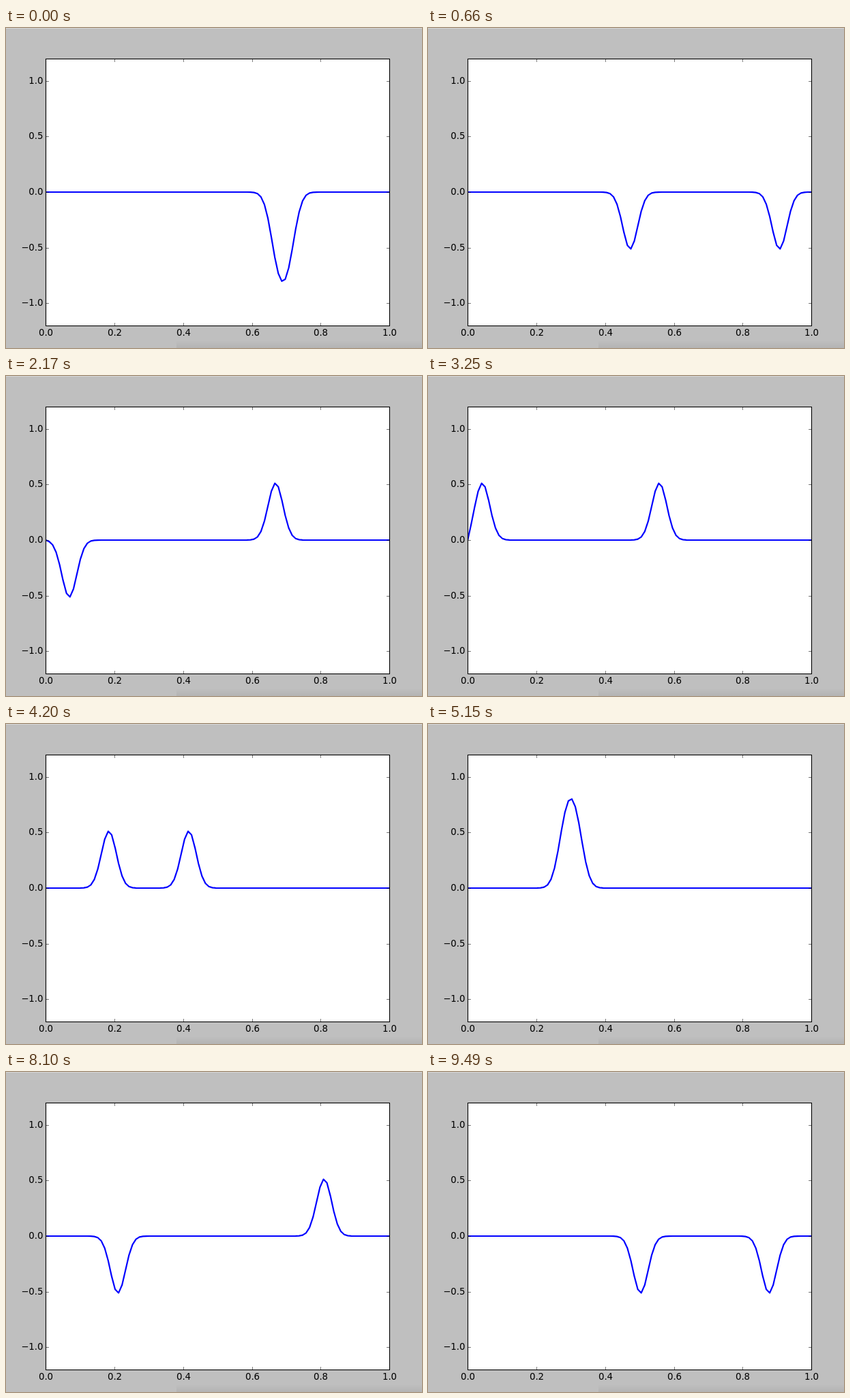
These frames come from a looping animation (610 by 470 pixels, 9590 ms). An HTML page with a canvas:

```html
<!DOCTYPE html>
<html lang="en">
<head>
<meta charset="utf-8">
<title>Wave on a string</title>
<style>
  html, body { margin: 0; width: 100%; height: 100%; overflow: hidden; background: #bfbfbf; }
  canvas { display: block; }
</style>
</head>
<body>
<canvas id="stage" width="610" height="470"></canvas>
<script>
const ctx = document.getElementById('stage').getContext('2d');
const LOOP = 9590;
const BOX = { x: 58.2, y: 45, w: 504, h: 392 };
const POINTS = 100, WALL = 98, START = 29.7, FIRST_STEP = 96.5;
const REST = 260, UPDATE = 60;

// Key points of the run: by this time the solver has done this many steps,
// in so many equal beats. Each beat is a rest, then a burst of updates.
const KEYS = [
  { time: 1680, step: 59 }, { time: 1840, step: 59 },
  { time: 2230, step: 65 }, { time: 2670, step: 65 },
  { time: 3370, step: 77 }, { time: 3890, step: 85 },
  { time: 4860, step: 99, beats: 2 }, { time: 6690, step: 130, beats: 4 },
  { time: 7060, step: 131 }, { time: 7840, step: 148 },
  { time: 8540, step: 162 }, { time: 9490, step: 179, beats: 3 }
];

// Share of a beat's steps done after the given time; updates slow down slightly.
function beatProgress(elapsed, length) {
  const rest = Math.min(REST, 0.6 * length);
  if (elapsed < rest) return 0;
  const gaps = Math.max(1, Math.round((length - rest) / UPDATE));
  const done = Math.floor((elapsed - rest) / (length - rest) * gaps + 0.25);
  const p = Math.min(1, (done + 1) / (gaps + 1));
  return p + 0.17 * p * (1 - p);
}

function stepAt(time) {
  let from = { time: 90 - REST, step: 0 };
  for (const to of KEYS) {
    if (time <= to.time) {
      const beats = to.beats || 1;
      const length = (to.time - from.time) / beats;
      const elapsed = time - from.time;
      const beat = Math.min(beats - 1, Math.floor(elapsed / length));
      const progress = beat + beatProgress(elapsed - beat * length, length);
      return Math.floor(from.step + (to.step - from.step) * progress / beats + 1e-6);
    }
    from = to;
  }
  return from.step;
}

const pulse = d => 0.513 * Math.exp(-d * d / 9.301);

// Odd images about both fixed ends turn reflection into a periodic function.
function travelling(x) {
  const period = 2 * WALL;
  const p = ((x % period) + period) % period;
  return pulse(p - START) - pulse(p - (period - START));
}

const height = (i, shift) =>
  i === 0 || i >= WALL ? 0 : travelling(i - shift) + travelling(i + shift);

const toX = v => BOX.x + v * BOX.w;
const toY = v => BOX.y + BOX.h / 2 - v * BOX.h / 2.4;
const snap = v => Math.round(v) + 0.5;

const frame = {
  left: snap(BOX.x), right: snap(BOX.x + BOX.w),
  top: snap(BOX.y), bottom: snap(BOX.y + BOX.h)
};

function segment(x1, y1, x2, y2) {
  ctx.beginPath();
  ctx.moveTo(x1, y1);
  ctx.lineTo(x2, y2);
  ctx.stroke();
}

function drawWindow() {
  ctx.fillStyle = '#bfbfbf';
  ctx.fillRect(0, 0, 610, 470);
  ctx.fillStyle = '#d6d6d6';
  ctx.fillRect(0, 0, 610, 1);
  const shade = ctx.createLinearGradient(0, 458, 0, 470);
  shade.addColorStop(0, 'rgba(0,0,0,0)');
  shade.addColorStop(1, 'rgba(0,0,0,0.06)');
  ctx.fillStyle = shade;
  ctx.fillRect(250, 458, 360, 12);
  ctx.fillStyle = '#fff';
  ctx.fillRect(frame.left, frame.top, BOX.w, BOX.h);
}

function drawWave(shift) {
  ctx.save();
  ctx.beginPath();
  ctx.rect(BOX.x, BOX.y, BOX.w, BOX.h);
  ctx.clip();
  ctx.beginPath();
  for (let i = 0; i < POINTS; i++) {
    ctx.lineTo(toX(i / (POINTS - 1)), toY(height(i, shift)));
  }
  ctx.strokeStyle = '#0000ff';
  ctx.lineWidth = 2.2;
  ctx.lineJoin = 'round';
  ctx.stroke();
  ctx.restore();
}

function drawAxes() {
  const { left, right, top, bottom } = frame;
  const label = v => v.toFixed(1).replace('-', '\u2212');
  ctx.strokeStyle = '#000';
  ctx.fillStyle = '#000';
  ctx.font = '13.33px "DejaVu Sans", sans-serif';
  ctx.lineWidth = 0.55;
  ctx.textAlign = 'center';
  for (let v = 0; v < 1.1; v += 0.2) {
    const x = snap(toX(v));
    segment(x, top, x, top + 4.4);
    segment(x, bottom, x, bottom - 4.4);
    ctx.fillText(label(v), x, 452);
  }
  ctx.textAlign = 'right';
  for (let v = -1; v <= 1; v += 0.5) {
    const y = snap(toY(v));
    segment(left, y, left + 4.4, y);
    segment(right, y, right - 4.4, y);
    ctx.fillText(label(v), 54.5, y + 3.5);
  }
  ctx.lineWidth = 1.1;
  ctx.strokeRect(left, top, right - left, bottom - top);
}

function render(now) {
  drawWindow();
  drawWave(FIRST_STEP + stepAt(now % LOOP));
  drawAxes();
  requestAnimationFrame(render);
}
requestAnimationFrame(render);
</script>
</body>
</html>
```
